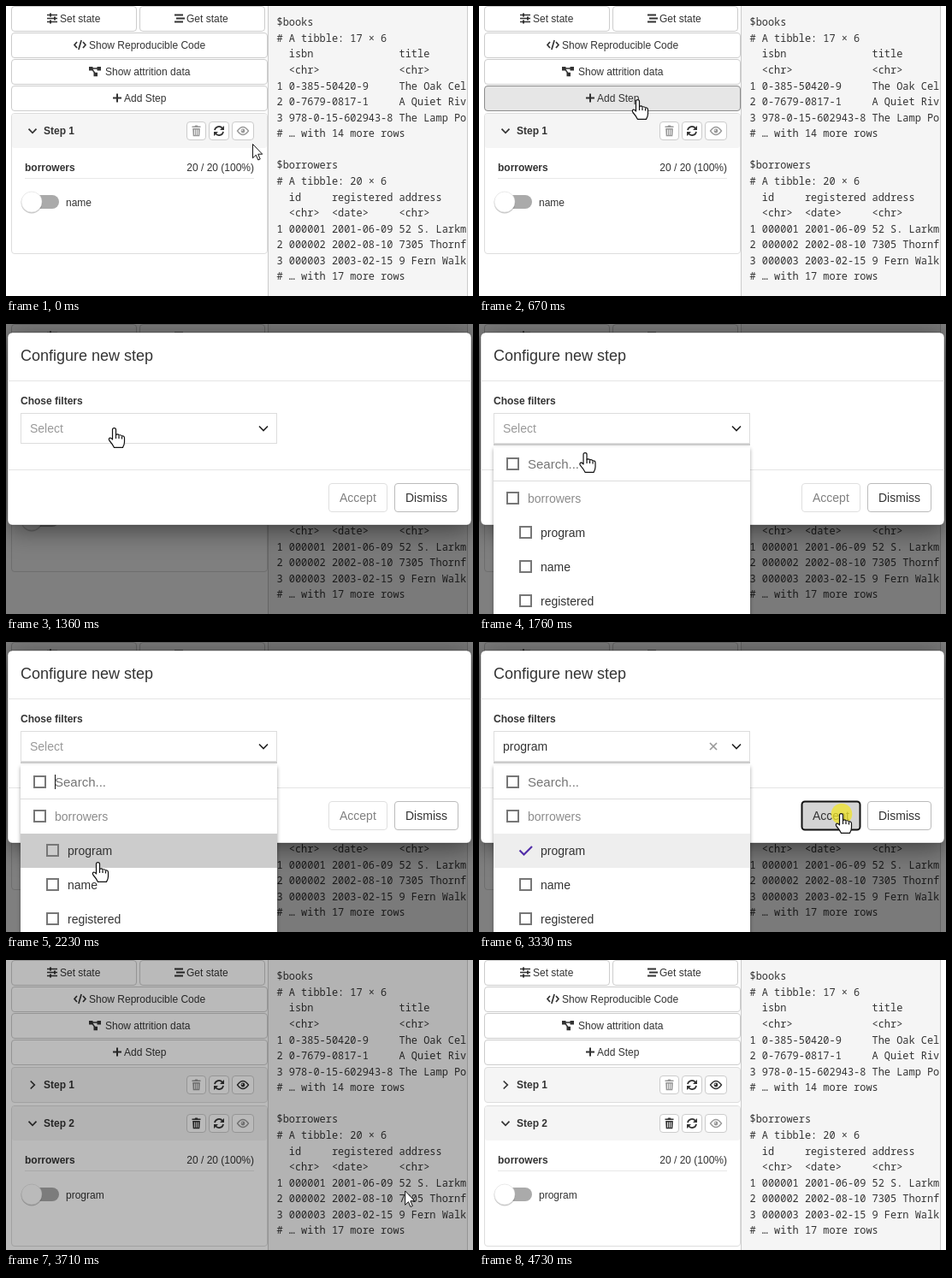
An HTML page that plays this animation: 546 by 339 pixels, repeating every 5.28 s.

```html
<!DOCTYPE html>
<html lang="en">
<head>
<meta charset="utf-8">
<title>Adding a filter step</title>
<style>
  html, body { margin: 0; width: 100%; height: 100%; overflow: hidden; background: #fff; }
  svg { display: block; width: 100vw; height: 100vh; }
  text { font: 12px "Liberation Sans", Arial, sans-serif; fill: #333; white-space: pre; }
  .bold { font-weight: bold; }
  .mid { font-size: 14px; }
  .search { font-size: 15px; fill: #757575; }
  .big { font-size: 18px; }
  .soft { fill: #8c8c8c; }
  .mono { font: 11.93px "Noto Sans Mono", "Liberation Mono", monospace; }
  .line { fill: none; stroke: #333; stroke-width: 1.7; }
  .box { fill: #fff; stroke: #777; stroke-width: 2; }
  .btn { fill: #fff; stroke: #ccc; }
  #sheet { filter: drop-shadow(0 5px 15px rgba(0,0,0,.5)); }
  #list > rect:first-child { filter: drop-shadow(0 2px 2px rgba(0,0,0,.35)); }
</style>
</head>
<body>
<svg id="stage" viewBox="0 0 546 339" xmlns="http://www.w3.org/2000/svg"></svg>
<script>
const LOOP = 5280;

const text = (x, y, s, cls = '', more = '') =>
  `<text x="${x}" y="${y}" class="${cls}" ${more}>${s}</text>`;
const rect = (x, y, w, h, more = '') =>
  `<rect x="${x}" y="${y}" width="${w}" height="${h}" ${more}/>`;
const at = (x, y, body, more = '') => `<g transform="translate(${x} ${y})" ${more}>${body}</g>`;
const button = (x, y, w, h, more = '') => rect(x, y, w, h, `rx="3.5" class="btn" ${more}`);

const icons = {
  sliders: `<path class="line" stroke-width="1.6" d="M-6 -4H6M-6 0H6M-6 4H6"/>
    <path class="line" style="stroke-width:2" d="M-2 -6V-2M3 -2V2M-2 2V6"/>`,
  stream: `<path class="line" style="stroke-width:2.2" d="M-6 -4H4M-4 0H6M-6 4H4"/>`,
  code: `<path class="line" d="M-3.5 -3.5L-6.5 0L-3.5 3.5M3.5 -3.5L6.5 0L3.5 3.5M1.6 -5.5L-1.6 5.5"/>`,
  diagram: `<path class="line" style="stroke-width:1.4" d="M-4 -3.5H4M-4 -3.5L1 3.5"/>
    <path fill="#333" d="M-7 -5.5h4.5v4.5h-4.5zM2.5 -5.5H7v4.5H2.5zM-1.5 1.2H3v4.6H-1.5z"/>`,
  plus: `<path class="line" style="stroke-width:2" d="M-5 0H5M0 -5V5"/>`,
  trash: `<path fill="#333" d="M-5 -5.5H-2L-1.3 -6.5H1.3L2 -5.5H5V-4H-5zM-4.3 -3H4.3L3.8 6.3H-3.8z"/>
    <path stroke="#fff" stroke-width=".9" d="M-2 -1.5V4.8M0 -1.5V4.8M2 -1.5V4.8"/>`,
  refresh: `<path class="line" d="M-5 -.8A5 5 0 0 1 4 -3M5 .8A5 5 0 0 1 -4 3"/>
    <path fill="#333" d="M6 -6V-1H1zM-6 6V1H-1z"/>`,
  eye: `<path class="line" style="stroke-width:1.3" d="M-6.5 0Q0 -9 6.5 0Q0 9 -6.5 0z"/>
    <circle r="2.4" fill="#333"/><circle cx="-.8" cy="-.8" r=".8" fill="#fff"/>`
};
const chevron = '<path class="line" d="M-4.5 -2.3L0 2.3L4.5 -2.3"/>';

function iconButton(x, w, name, dim) {
  return button(x + .5, 10.5, w - 1, 21) +
    at(x + w / 2, 21, icons[name], dim ? 'opacity=".5"' : '');
}

function header(n, dimTrash, dimEye) {
  return text(44, 25, 'Step ' + n, 'bold') + iconButton(211, 23, 'trash', dimTrash) +
    iconButton(237, 24, 'refresh') + iconButton(264, 26, 'eye', dimEye);
}

function openCard(y, n, field, dimTrash, arrowId) {
  return at(0, y,
    rect(6.5, .5, 299, 164, 'rx="3.5" fill="#fff" stroke="#ddd"') +
    rect(7, 1, 298, 40, 'rx="3" fill="#f5f5f5"') + header(n, dimTrash, true) +
    at(31, 21, `<g id="${arrowId}">${chevron}</g>`) +
    text(22, 68, 'borrowers', 'bold') + text(290, 68, '20 / 20 (100%)', '', 'text-anchor="end"') +
    rect(22, 76, 268, 1, 'fill="#e8e8e8"') +
    rect(22, 96, 40, 16, 'rx="8" fill="#aaa"') +
    '<circle cx="30" cy="105" r="12.4" fill="#000" opacity=".22"/>' +
    '<circle cx="30" cy="104" r="12" fill="#fff" stroke="#ddd" stroke-width=".6"/>' +
    text(70, 109, field));
}

const listing = `$books
# A tibble: 17 × 6
  isbn              title
  &lt;chr&gt;             &lt;chr&gt;
1 0-385-50420-9     The Oak Cel
2 0-7679-0817-1     A Quiet Riv
3 978-0-15-602943-8 The Lamp Po
# … with 14 more rows

$borrowers
# A tibble: 20 × 6
  id     registered address
  &lt;chr&gt;  &lt;date&gt;     &lt;chr&gt;
1 000001 2001-06-09 52 S. Larkm
2 000002 2002-08-10 7305 Thornf
3 000003 2003-02-15 9 Fern Walk
# … with 17 more rows`;

const page =
  button(6.5, .5, 146, 29) + at(54, 14.5, icons.sliders) + text(63, 19, 'Set state') +
  button(156.5, .5, 146, 29) + at(203, 14.5, icons.stream) + text(211, 19, 'Get state') +
  button(6.5, 31.5, 299, 29) + at(86.5, 45.5, icons.code) + text(97, 50, 'Show Reproducible Code') +
  button(6.5, 62.5, 299, 29) + at(104, 76.5, icons.diagram) + text(116, 81, 'Show attrition data') +
  button(6.5, 93.5, 299, 29, 'id="add"') + at(130, 107.5, icons.plus) + text(138, 112, 'Add Step') +
  `<g id="before">${openCard(125, 1, 'name', true, 'arrow0')}</g>` +
  '<g id="after">' +
    at(0, 125, rect(6.5, .5, 299, 41, 'rx="3.5" fill="#f5f5f5" stroke="#ddd"') +
      header(1, true, false) + at(31, 21, `<g id="turn">${chevron}</g>`)) +
    openCard(170, 2, 'program', false, 'arrow2') +
  '</g>' +
  rect(306.5, -5, 233, 350, 'fill="#f5f5f5" stroke="#ccc"') +
  listing.split('\n').map((s, i) => text(316.5, 23.3 + i * 18.57, s, 'mono')).join('');

const check = (x, y) => rect(x, y, 13, 13, 'class="box"');
const option = (y, name, rowId, markId) =>
  rect(17, y, 300, 40, `id="${rowId}" fill="#fff"`) +
  `<g id="${markId}">${check(48, y + 13)}</g>` + text(72, y + 25, name, 'mid');

const list = '<g id="list">' +
  rect(17, 144, 300, 210, 'fill="#fff"') +
  check(33, 157) + text(57, 169, 'Search...', 'search') +
  rect(57, 155, 1, 17, 'id="caret" fill="#111"') +
  rect(17, 183, 300, 1, 'fill="#ddd"') +
  check(33, 197) + text(57, 209, 'borrowers', 'mid soft') +
  option(224, 'program', 'row', 'empty') +
  '<path id="tick" class="line" style="stroke:#512da8;stroke-width:2.2" d="M47.5 243.5L52.5 248.5L62 239"/>' +
  option(264, 'name', 'rowB', 'markB') + option(304, 'registered', 'rowC', 'markC') + '</g>';

const modal = '<g id="modal">' +
  rect(2, 10, 542, 225, 'rx="5.5" fill="#fff" stroke="#000" stroke-opacity=".3" id="sheet"') +
  text(17, 43, 'Configure new step', 'big') +
  rect(2, 66, 542, 1, 'fill="#e5e5e5"') + rect(2, 170, 542, 1, 'fill="#e5e5e5"') +
  text(17, 94, 'Chose filters', 'bold') +
  rect(17, 140, 300, 2, 'id="lift" fill="#000" opacity=".2"') +
  rect(17.5, 104.5, 299, 35, 'fill="#fff" stroke="#ddd"') +
  text(28, 127, 'Select', 'mid', 'id="value"') +
  '<path id="clear" class="line" style="stroke:#999" d="M270 118l8 8m0 -8l-8 8"/>' +
  at(301, 122, '<path class="line" style="stroke:#222;stroke-width:1.6" d="M-5 -2.5L0 2.5L5 -2.5"/>') +
  '<g id="accept">' + button(377.5, 186.5, 68, 33, 'id="acceptBox"') +
    text(390, 208, 'Accept', 'mid') + '</g>' +
  button(454.5, 186.5, 74, 33, 'style="stroke:#bbb"') + text(467, 208, 'Dismiss', 'mid') +
  list + '</g>';

const pointer = '<circle id="glow" r="12.3" cy="1" fill="#f0e428" opacity=".75"/>' +
  '<path id="arrow" fill="#fff" stroke="#111" d="M.5 .5V16.8L4.3 13.2L6.8 19L9.2 18L6.7 12.2H11.7Z"/>' +
  `<g id="hand" stroke="#111" stroke-width="1.2" fill="#fff" stroke-linejoin="round">
    <path d="M-2.5 2.5Q-2.5 .6 -.5 .6Q1.5 .6 1.5 2.5V8.5Q4 7.2 5 9Q7.5 8.2 8.5 10Q11.5 9.5 11.5 12.5V17
      Q11.5 20 9.5 23.4H-.5Q-2 20 -6 15.5Q-7.5 13 -5.5 12Q-4 12 -2.5 14Z"/>
    <path fill="none" d="M1.5 8.5V13M5 9.5V13M8.5 10.5V13.5"/></g>`;

const stage = document.getElementById('stage');
stage.innerHTML = page + rect(0, 0, 546, 339, 'id="shade"') + modal + `<g id="pointer">${pointer}</g>`;

const $ = id => document.getElementById(id);
const set = (id, name, value) => $(id).setAttribute(name, value);
const show = (id, on) => set(id, 'visibility', on ? 'visible' : 'hidden');
const ramp = (t, a, b) => Math.min(1, Math.max(0, (t - a) / (b - a)));
const easeOut = p => 1 - (1 - p) ** 1.7;
const within = (t, a, b) => t >= a && t < b;

// time, x, y of the pointer tip
const path = [
  [0, 288, 161], [280, 186, 109], [1050, 186, 109], [1372, 127, 121], [1610, 127, 121],
  [1918, 122, 180], [2230, 108, 257], [2464, 112, 240], [2640, 112, 240], [3010, 421, 202],
  [3088, 424, 200], [3400, 424, 200], [3478, 424, 202], [3790, 474, 282], [3946, 475, 285],
  [4414, 475, 285], [4726, 506, 345]
];

function tip(t) {
  const i = path.findIndex(k => k[0] > t);
  if (i < 0) return path[path.length - 1].slice(1);
  const [a, b] = [path[i - 1], path[i]];
  const p = ramp(t, a[0], b[0]), e = p * p * (3 - 2 * p);
  return [a[1] + (b[1] - a[1]) * e, a[2] + (b[2] - a[2]) * e];
}

function hold(t) {
  return t < 280 ? Math.floor(t / 70) * 70 : 280 + Math.floor((t - 266) / 78) * 78;
}

function draw(now) {
  const t = hold(now % LOOP);
  const [x, y] = tip(t);

  // page
  const added = t >= 3430;
  const overAdd = t < 1000 && y < 123;
  const pressed = within(t, 590, 660);
  set('add', 'style', overAdd || within(t, 1000, 3430)
    ? `fill:${pressed ? '#d4d4d4' : '#e6e6e6'};stroke:${t >= 590 ? '#8c8c8c' : '#adadad'}` : '');
  show('before', !added);
  show('after', added);
  set('turn', 'transform', `rotate(${-90 * ramp(t, 3430, 3530)})`);
  set('shade', 'opacity', .5 * (ramp(t, 852, 1002) - ramp(t, 3645, 3790)));

  // dialog
  const closing = t >= 3345;
  const slide = closing ? easeOut(ramp(t, 3345, 3645)) : 1 - easeOut(ramp(t, 1000, 1300));
  set('modal', 'transform', `translate(0 ${-56 * slide})`);
  set('modal', 'opacity', ramp(t, 1000, 1150) - ramp(t, 3345, 3495));

  const open = ramp(t, 1500, 1660);
  set('list', 'opacity', open - ramp(t, 3345, 3440));
  set('list', 'transform', `translate(0 ${-6 * (1 - open)})`);
  set('lift', 'opacity', .2 * open);

  const chosen = t >= 2610;
  const overRow = within(t, 1900, 3000) && x < 317 && y >= 224 && y < 264;
  set('row', 'fill', overRow ? '#ccc' : chosen ? '#eee' : '#fff');
  set('empty', 'opacity', chosen ? 0 : 1);
  set('tick', 'opacity', chosen ? 1 : 0);
  set('empty', 'style', overRow ? '--c:#ccc' : '');
  $('empty').firstElementChild.style.fill = overRow ? '#ccc' : '#fff';
  set('caret', 'opacity', within(t, 1990, 2520) ? 1 : 0);
  set('clear', 'opacity', chosen ? 1 : 0);
  $('value').textContent = chosen ? 'program' : 'Select';
  $('value').style.fill = chosen ? '#333' : '#999';

  const overAccept = within(t, 2800, 3345) && x >= 377;
  set('accept', 'opacity', chosen ? 1 : .62);
  set('acceptBox', 'style', t >= 3320 && t < 3400
    ? 'fill:#d4d4d4;stroke:#111;stroke-width:2'
    : overAccept ? 'fill:#e6e6e6;stroke:#adadad' : '');

  // pointer
  const gap = x > 317 && x < 377;
  const hand = (t < 900 && overAdd) || (within(t, 1250, 3345) && !gap);
  const click = pressed || within(t, 1440, 1590) || within(t, 2535, 2610) || within(t, 3320, 3390);
  set('pointer', 'transform', `translate(${x} ${y})`);
  set('pointer', 'opacity', t < 4720 ? 1 : 0);
  set('hand', 'opacity', hand ? 1 : 0);
  set('arrow', 'opacity', hand ? 0 : 1);
  set('glow', 'opacity', click ? .75 : 0);
}

const start = performance.now();
function tick() {
  draw(performance.now() - start);
  requestAnimationFrame(tick);
}
draw(0);
tick();
</script>
</body>
</html>
```
